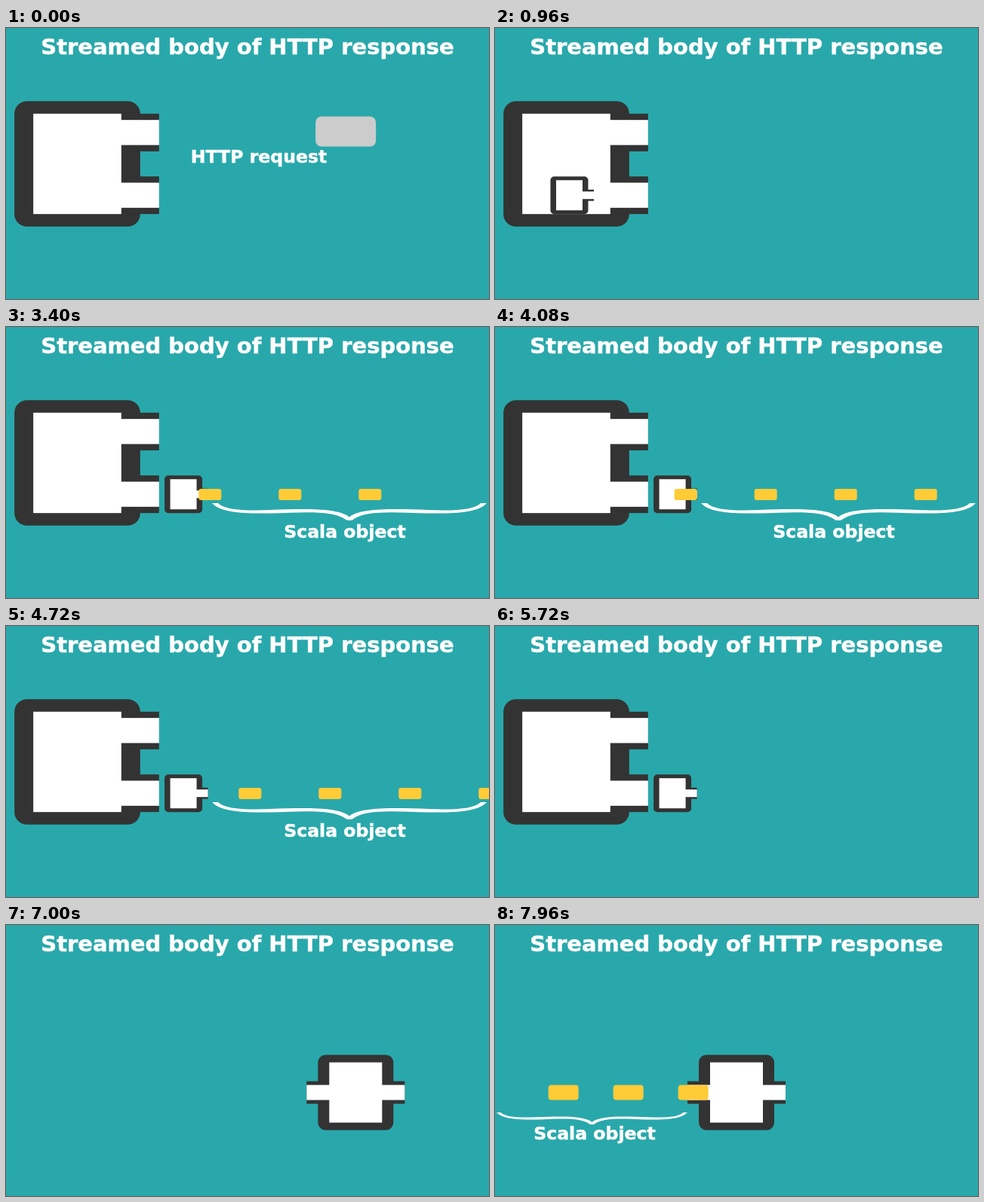
An HTML page that plays this animation: 640 by 360 pixels, repeating every 8000 ms.

```html
<!DOCTYPE html>
<html lang="en">
<head>
<meta charset="utf-8">
<title>Streamed body of HTTP response</title>
<style>
  html, body { margin: 0; width: 100%; height: 100%; overflow: hidden; background: #29a8ab; }
  svg { display: block; width: 100vw; height: 100vh; }
  text {
    font: bold 23.6px "DejaVu Sans", sans-serif;
    text-anchor: middle;
    fill: #fff;
    stroke: #fff;
    stroke-width: .5px;
  }
  .title { font-size: 29px; }
</style>
</head>
<body>
<svg id="stage" viewBox="0 0 640 360">
  <defs>
    <path id="half" d="M-182 0C-170 13-140 14-105 13.5C-60 12-20 9-4 22.5L0 23V18.5C-15 6-60 7.5-105 9C-140 10.5-165 9-174 0Z"/>
    <g id="brace" fill="#fff">
      <use href="#half"/>
      <use href="#half" transform="scale(-1 1)"/>
    </g>
  </defs>
  <rect width="640" height="360" fill="#29a8ab"/>
  <text class="title" x="320" y="35">Streamed body of HTTP response</text>
</svg>
<script>
const LOOP = 8000, STEP = 40, SECOND = 960;
const stage = document.getElementById('stage');

function add(parent, tag, attrs, text) {
  const el = document.createElementNS('http://www.w3.org/2000/svg', tag);
  for (const key in attrs) el.setAttribute(key, attrs[key]);
  if (text) el.textContent = text;
  return parent.appendChild(el);
}

const group = () => add(stage, 'g', {});

function box(parent, x, y, width, height, fill, rx = 0) {
  return add(parent, 'rect', { x, y, width, height, fill, rx });
}

// A module is a 100-unit box around its centre; each pipe is [side, y].
function module(parent, pipes) {
  const g = add(parent, 'g', {});
  box(g, -50, -50, 100, 100, '#333', 10);
  for (const [side, y] of pipes) box(g, side < 0 ? -65 : 40, y - 15, 25, 30, '#333');
  box(g, -35, -40, 70, 80, '#fff');
  for (const [side, y] of pipes) box(g, side < 0 ? -65 : 34, y - 10, 31, 20, '#fff');
  return g;
}

function place(el, x, y, scale = 1) {
  el.setAttribute('transform', `translate(${x} ${y}) scale(${scale})`);
}

function show(el, on) {
  el.style.display = on ? '' : 'none';
}

// A row of chunks leaving one after another, with a labelled brace below.
function makeStream({ start, end, count, from, to, size, brace, label }) {
  const note = group();
  place(add(note, 'use', { href: '#brace' }), ...brace);
  add(note, 'text', { x: label[0], y: label[1] }, 'Scala object');
  const chunks = Array.from({ length: count }, () =>
    box(stage, 0, 222.5 - size / 4, size, size / 2, '#ffcb37', size / 10));
  return t => {
    show(note, t >= start && t < end);
    chunks.forEach((chunk, i) => {
      const p = (t - start) / SECOND - i / 4;
      show(chunk, p >= 0 && p < 1);
      chunk.setAttribute('x', from + (to - from) * p);
    });
  };
}

const clamp = v => Math.min(1, Math.max(0, v));
const progress = (t, start, length) => clamp((t - start) / length);
const mix = (a, b, p) => a + (b - a) * p;

const serverScene = group();
place(module(serverScene, [[1, -25], [1, 25]]), 94.5, 180.5, 5 / 3);
const source = module(serverScene, [[1, 0]]);
const request = group();
const packet = box(request, 0, 117.5, 80, 40, '#ccc', 8);
add(request, 'text', { x: 335, y: 179 }, 'HTTP request');
const client = module(stage, [[-1, 0], [1, 0]]);

const streams = [
  makeStream({
    start: 2840, end: 5720, count: 9, from: 220, to: 644, size: 30,
    brace: [455, 234, 1], label: [449, 280]
  }),
  makeStream({
    start: 7160, end: LOOP, count: 3, from: -44, to: 300, size: 40,
    brace: [128.5, 249, .695], label: [132, 285]
  })
];

function render(t) {
  show(serverScene, t < 6680);
  show(request, t < 920);
  packet.setAttribute('x', mix(440, 82, progress(t, -40, SECOND / 2)));

  show(source, t >= 920);
  place(source, mix(98, 235.1, progress(t, 920, SECOND) ** 1.78), 222.2, .5);

  show(client, t >= 6680);
  place(client, mix(750, 320, progress(t, 6680, SECOND / 2)), 222.5);

  for (const update of streams) update(t);
}

const begin = performance.now();
function tick() {
  const t = (performance.now() - begin) % LOOP;
  render(Math.floor(t / STEP) * STEP);
  requestAnimationFrame(tick);
}
tick();
</script>
</body>
</html>
```
